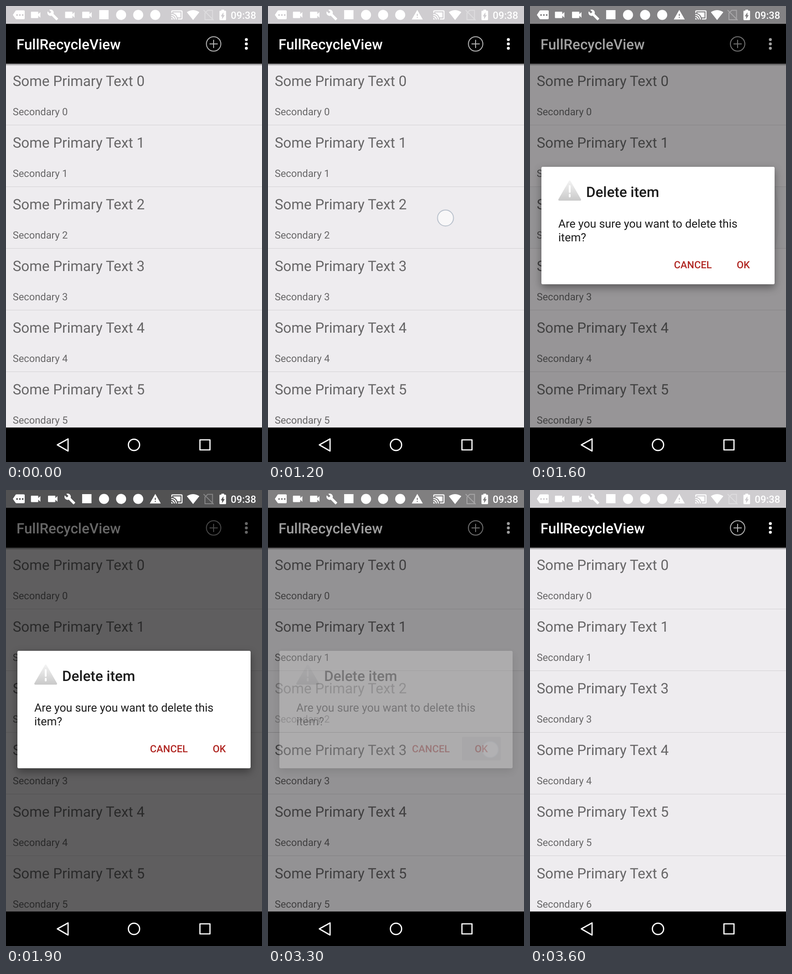
An HTML page for the animation above (5100 ms loop, 561 by 998 pixels).

```html
<!DOCTYPE html>
<html lang="en">
<head>
<meta charset="utf-8">
<title>List with delete dialog</title>
<style>
html, body { margin: 0; height: 100%; overflow: hidden; background: #000; }
svg { display: block; width: 561px; height: 998px; font-family: Roboto, sans-serif; text-rendering: geometricPrecision; }
.h { font-size: 31.4px; }
.b { font-size: 24.9px; }
.s { font-size: 21.9px; }
.m { font-weight: 500; }
#sheet { filter: drop-shadow(0 7px 9px rgba(0, 0, 0, .4)); }
</style>
</head>
<body>
<svg viewBox="0 0 561 998">
  <defs>
    <clipPath id="row"><rect y="396" width="561" height="134"/></clipPath>
    <linearGradient id="shade" x2="0" y2="1"><stop stop-opacity=".5"/><stop offset="1" stop-opacity="0"/></linearGradient>
    <linearGradient id="grey" x2="0" y2="1"><stop stop-color="#f2f2f2"/><stop offset="1" stop-color="#cbcbcb"/></linearGradient>
    <path id="cam" transform="scale(1.15) translate(-12 -12)" d="M17 10.5V7c0-.55-.45-1-1-1H4c-.55 0-1 .45-1 1v10c0 .55.45 1 1 1h12c.55 0 1-.45 1-1v-3.5l4 4v-11l-4 4z"/>
    <path id="wrench" transform="scale(1.07) translate(-12 -12)" d="M22.7 19l-9.1-9.1c.9-2.3.4-5-1.5-6.9-2-2-5-2.4-7.4-1.3L9 6 6 9 1.6 4.7C.4 7.1.9 10.1 2.9 12.1c1.9 1.9 4.6 2.4 6.9 1.5l9.1 9.1c.4.4 1 .4 1.4 0l2.3-2.3c.5-.4.5-1.1.1-1.4z"/>
    <path id="warn" transform="scale(1.1) translate(-12 -12)" d="M1 21h22L12 2 1 21zm12-3h-2v-2h2v2zm0-4h-2v-4h2v4z"/>
    <rect id="box" x="-10.5" y="-10.5" width="20.5" height="20"/>
    <circle id="dot" r="11"/>
  </defs>

  <rect width="561" height="923" fill="#eeecef"/>
  <g id="press" clip-path="url(#row)">
    <rect y="396" width="561" height="134" opacity=".03"/>
    <circle id="ripple" cy="463" opacity=".05"/>
  </g>
  <g id="lines" fill="#d3d1d4"></g>
  <g id="list" fill="#000" fill-opacity=".57"></g>
  <rect y="126" width="561" height="5" fill="url(#shade)"/>
  <rect width="561" height="39" fill="#cfcdd0"/>
  <rect y="39" width="561" height="87"/>
  <text class="h m" x="23" y="95" fill="#fff">FullRecycleView</text>
  <g fill="none" stroke="#b4b4b4" stroke-width="2"><circle cx="455" cy="83" r="15.8"/><path d="M446 83h18M455 74v18"/></g>
  <g fill="#fff"><circle cx="526.7" cy="73.5" r="3.2"/><circle cx="526.7" cy="83" r="3.2"/><circle cx="526.7" cy="92.5" r="3.2"/></g>
  <rect id="dim" width="561" height="923"/>

  <g id="dialog">
    <rect id="sheet" x="25" y="352" width="511" height="257" rx="3" fill="#fff"/>
    <path d="M87 384L110 424H64z" fill="url(#grey)" stroke="url(#grey)" stroke-width="4" stroke-linejoin="round"/>
    <path d="M87 394v13M87 413v4" stroke="#fff" stroke-width="4" stroke-linecap="round"/>
    <g fill="#1c1c1c">
      <text class="h m" x="123" y="418">Delete item</text>
      <text class="b" x="62" y="485">Are you sure you want to delete this</text>
      <text class="b" x="62" y="515">item?</text>
    </g>
    <rect id="button" x="425" y="540" width="85" height="52" rx="3"/>
    <g class="s m" fill="#b02622"><text x="315.5" y="574">CANCEL</text><text x="453" y="574">OK</text></g>
  </g>

  <g fill="#fff">
    <path fill-rule="evenodd" d="M15 19.5l6-9q.7-1 2-1H39q2 0 2 2V27q0 2-2 2H23q-1.3 0-2-1zM22.5 18v3.4h3.4V18zM28.7 18v3.4h3.4V18zM34.9 18v3.4h3.4V18z"/>
    <g id="slots"></g>
    <path transform="translate(374.5 19.5) scale(1.12) translate(-12 -12)" d="M5 7v1.63c3.96 1.28 7.09 4.41 8.37 8.37H19V7zM21 3H3c-1.1 0-2 .9-2 2v3h2V5h18v14h-7v2h7c1.1 0 2-.9 2-2V5c0-1.1-.9-2-2-2zM1 18v3h3c0-1.66-1.34-3-3-3zm0-4v2c2.76 0 5 2.24 5 5h2c0-3.87-3.13-7-7-7zm0-4v2c4.97 0 9 4.03 9 9h2c0-6.08-4.93-11-11-11z"/>
    <path transform="translate(410 19.5) scale(1.18) translate(-12 -12)" d="M12 21.5L23.64 7C23.19 6.66 18.71 3 12 3S.81 6.66.36 7z"/>
    <path d="M442 9.5h10.5V30H436V15.5zM433 9l22 22" fill="none" stroke="#fff" stroke-width="2" opacity=".3"/>
    <path transform="translate(475 19.5) scale(1.45 1.15) translate(-12 -12)" d="M15.67 4H14V2h-4v2H8.33C7.6 4 7 4.6 7 5.33v15.33C7 21.4 7.6 22 8.33 22h7.33c.74 0 1.34-.6 1.34-1.33V5.33C17 4.6 16.4 4 15.67 4zM11 20v-5.5H9L13 7v5.5h2z"/>
    <text class="s m" x="492.5" y="28">09:38</text>
  </g>

  <rect y="922.5" width="561" height="76"/>
  <g fill="none" stroke="#fff" stroke-width="2.7" stroke-linejoin="round"><path d="M112.5 960.5L136 947.5V974zM425 949.5h22v22h-22z"/><circle cx="280.5" cy="960.5" r="12.3"/></g>
  <circle id="touch" r="17.5" fill="#fff" fill-opacity=".6" stroke="#b9c1cc" stroke-width="2"/>
</svg>
<script>
const $ = id => document.getElementById(id);
const set = (el, attrs) => { for (const k in attrs) el.setAttribute(k, attrs[k]); };
const clamp = v => Math.min(1, Math.max(0, v));
const ROW = 135;

for (let i = 0; i < 7; i++) {
  $('list').innerHTML += `<g><text class="h" x="14.7" y="175">Some Primary Text ${i}</text><text class="s" x="14.7" y="239">Secondary ${i}</text></g>`;
  if (i < 5) $('lines').innerHTML += `<rect y="${260 + ROW * i}" width="561" height="1"/>`;
}
for (let i = 0; i < 8; i++)
  $('slots').innerHTML += `<use transform="translate(${65 + 37.45 * i} 19.5)"/>`;

const icons = [
  'cam wrench cam cam box dot dot dot',
  'cam wrench cam box dot dot dot warn',
  'cam cam wrench box dot dot dot warn'
].map(s => s.split(' '));

// Piecewise linear value through [time, value] pairs
function track(t, ...keys) {
  const n = keys.findIndex(k => k[0] > t);
  if (n < 1) return keys[n ? keys.length - 1 : 0][1];
  const [t0, a] = keys[n - 1], [t1, b] = keys[n];
  return a + (b - a) * (t - t0) / (t1 - t0);
}

function draw(t) {
  [...$('slots').children].forEach((el, i) => set(el, { href: '#' + icons[Math.min(2, t / 100)][i] }));

  const grow = clamp((t - 1200) * .0022);
  set($('ripple'), { cx: 389 - 109 * grow, r: 288 * grow });
  set($('press'), { opacity: track(t, [1200, 0], [1300, 1], [1500, 1], [1700, 0]) });

  // The removed row fades, then the rows below slide up
  const fade = clamp((3350 - t) / 110);
  const slide = (1 - Math.cos(Math.PI * clamp((t - 3350) / 250))) / 2;
  [...$('list').children].forEach((el, i) =>
    set(el, { transform: `translate(0 ${ROW * (i - (i > 2 ? slide : 0))})`, opacity: i == 2 ? fade : 1 }));
  set($('lines').children[2], { fill: fade > 0 && fade < 1 ? '#bbb9bc' : '#d3d1d4' });

  set($('dim'), { opacity: track(t, [1400, 0], [1500, .14], [1700, .6], [3200, .6], [3400, .17], [3500, 0]) });
  set($('dialog'), { opacity: track(t, [1400, 0], [1500, .57], [1600, 1], [3200, 1], [3300, .24], [3400, 0]) });
  set($('button'), { opacity: track(t, [3000, 0], [3100, .01], [3200, .08]) });

  const late = t > 2000;
  set($('touch'), {
    cx: late ? 487 : 389, cy: late ? 568 : 464,
    opacity: track(t, [1100, 0], [1200, 1], [1300, 1], [1500, 0], [3000, 0], [3100, 1], [3200, 1], [3300, .2], [3400, 0])
  });
}

function tick() {
  draw(Math.floor(performance.now() % 5100 / 100) * 100);
  requestAnimationFrame(tick);
}
tick();
</script>
</body>
</html>
```
